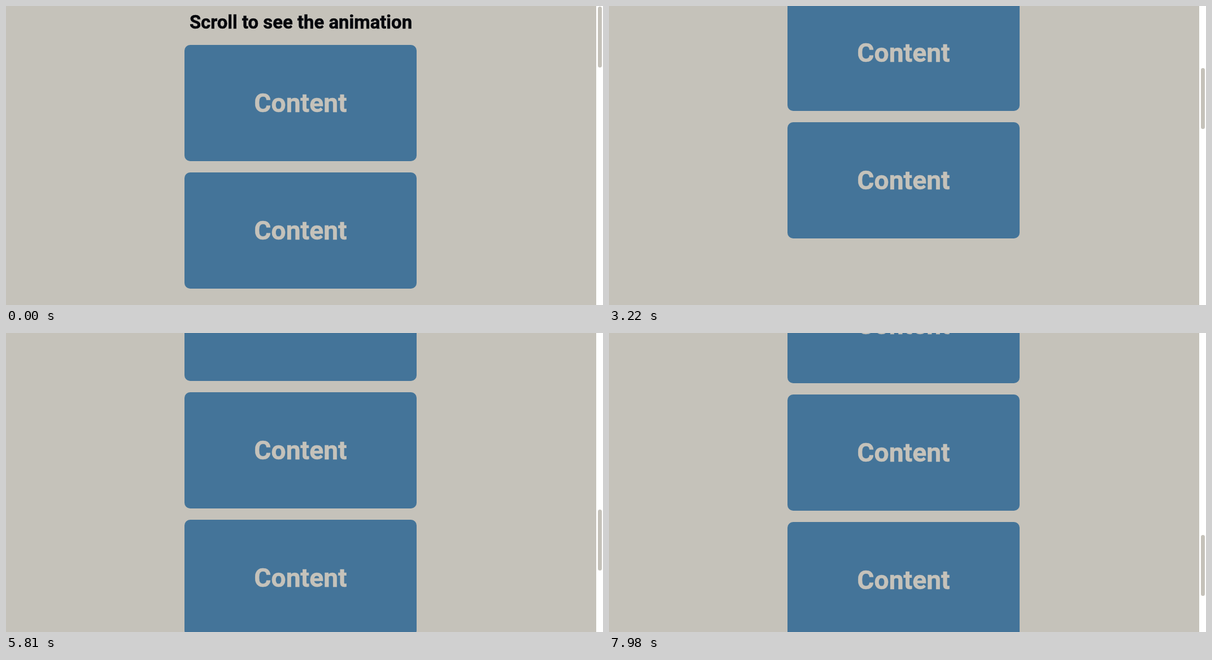
Recreate the animation shown at these times as an HTML page. Size 1057 px wide and 530 px high, loop 8 s.

```html
<!DOCTYPE html>
<html lang="en">
<head>
<meta charset="utf-8">
<title>Scroll animation</title>
<style>
  :root { --paper: #c5c2ba; }
  html, body { margin: 0; width: 100%; height: 100%; overflow: hidden; background: var(--paper); }
  body { position: relative; font: 700 46.2px/1.172 Roboto, sans-serif; -webkit-text-stroke: 0.5px; }
  h1, .box, #track, #thumb { position: absolute; margin: 0; }
  h1 { top: 10.3px; left: 0; width: 1044px; font-size: 32.88px; text-align: center; color: #05070c; }
  .box {
    left: 316px; top: 0; width: 411px; height: 206px; border-radius: 10px;
    display: flex; align-items: center; justify-content: center;
    background: #447499; color: var(--paper);
  }
  #track { left: 1045px; top: 0; width: 12px; height: 530px; background: #fff; }
  #thumb { left: 3px; top: 1px; width: 7px; height: 108px; border-radius: 4px; background: var(--paper); }
</style>
</head>
<body>
<h1 id="title">Scroll to see the animation</h1>
<div id="track"><div id="thumb"></div></div>
<script>
const LOOP = 8000, STEP = 70, COUNT = 11;
const TRIGGER = 424, SLIDE = 1644, SLIDE_MS = 400, THUMB_RATIO = 4.952;

const boxTop = k => 69.3 + k * 226.05;
const reveal = k => boxTop(k) - TRIGGER; // scroll position that brings box k in

// Key scroll positions: [ms, px]
const path = [
  [0, 0], [700, 0], [1610, 151], [1800, 151],
  [2200, reveal(3)], [2450, 352.4],
  [3823.4, reveal(5)], [3990, 915.5],
  [4700, reveal(7)], [4900, 1355.4],
  [6430, reveal(9)], [6580, 1749.2],
  [7250, 2040], [LOOP, 1768.5]
];

const slope = i => (path[i + 1][1] - path[i][1]) / (path[i + 1][0] - path[i][0]);

// Monotone tangent at a key position
function tangent(i) {
  if (i === 0 || i === path.length - 1) return 0;
  const a = slope(i - 1), b = slope(i);
  return a * b > 0 ? 2 * a * b / (a + b) : 0;
}

function scrollAt(t) {
  const i = path.findIndex(p => p[0] > t) - 1;
  const [t0, y0] = path[i], [t1, y1] = path[i + 1];
  const d = t1 - t0, u = (t - t0) / d, v = 1 - u;
  return y0 * (1 + 2 * u) * v * v + y1 * u * u * (3 - 2 * u)
    + d * u * v * (tangent(i) * v - tangent(i + 1) * u);
}

// CSS "ease": cubic-bezier(.25, .1, .25, 1)
function ease(x) {
  if (x >= 1) return 1;
  let lo = 0, hi = 1, s;
  for (let n = 0; n < 24; n++) {
    s = (lo + hi) / 2;
    if (0.75 * s * (1 - s) + s ** 3 < x) lo = s; else hi = s;
  }
  return 0.3 * s * (1 - s) ** 2 + 3 * s * s * (1 - s) + s ** 3;
}

// Moments at which box k crosses the trigger line, either way
function findChanges(k) {
  let gap = reveal(k);
  const changes = [{ at: -LOOP, shown: gap < 0 }];
  for (let t = 1; t < LOOP; t++) {
    const next = reveal(k) - scrollAt(t);
    if (next < 0 !== gap < 0) changes.push({ at: t - next / (next - gap), shown: next < 0 });
    gap = next;
  }
  return changes;
}

const boxes = Array.from({ length: COUNT }, (_, k) => {
  const el = document.createElement("div");
  el.className = "box";
  el.textContent = "Content";
  track.before(el);
  return { el, top: boxTop(k), side: k % 2 ? -1 : 1, changes: findChanges(k) };
});

function draw(now) {
  const t = Math.floor(now % LOOP / STEP) * STEP;
  const y = scrollAt(t);
  title.style.transform = `translateY(${-y}px)`;
  thumb.style.transform = `translateY(${Math.round(y / THUMB_RATIO)}px)`;
  for (const { el, top, side, changes } of boxes) {
    const { at, shown } = changes.findLast(c => c.at <= t);
    const p = ease((t - at) / SLIDE_MS);
    const x = side * SLIDE * (shown ? 1 - p : p);
    el.style.transform = `translate(${Math.round(x)}px, ${Math.round(top - y)}px)`;
  }
}

const start = performance.now();
function tick() {
  draw(performance.now() - start);
  requestAnimationFrame(tick);
}
tick();
</script>
</body>
</html>
```
